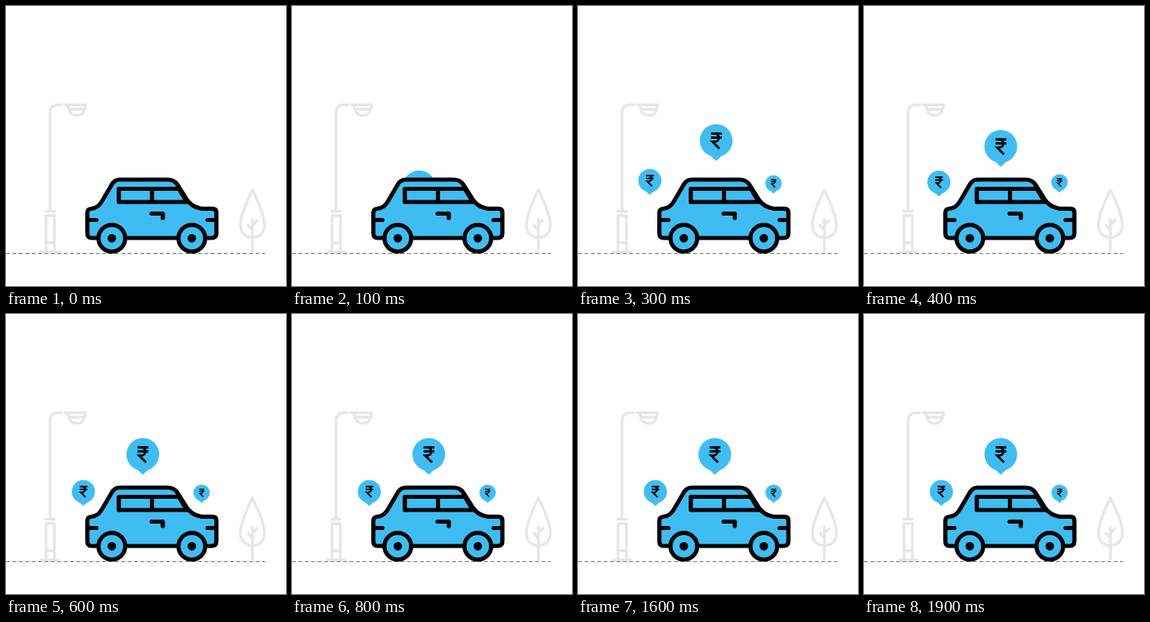
An HTML page that plays this animation: 350 by 350 pixels, repeating every 2000 ms.

```html
<!DOCTYPE html>
<html lang="en">
<head>
<meta charset="utf-8">
<title>Car with rupee pins</title>
<style>
  html, body { margin: 0; width: 100%; height: 100%; overflow: hidden; background: #fff; }
  svg { display: block; width: 100vw; height: 100vh; }
  path, circle { stroke-linejoin: round; }
  .scenery { fill: none; stroke: #e6e6e6; stroke-width: 3.4; }
  .car { fill: #3fbdf3; stroke: #000; stroke-width: 5.2; stroke-linecap: round; }
  .pin { fill: #3fbdf3; }
  .sign { fill: none; stroke: #000; stroke-width: 2.9; stroke-linejoin: miter; }
</style>
</head>
<body>
<svg viewBox="0 0 350 350">
  <defs>
    <g id="pin">
      <path class="pin" d="M-9 17 L0 25.5 L9 17Z"/>
      <circle class="pin" r="20.5"/>
      <path class="sign" d="M-6.5 -8.8H7M-6.5 -3.8H7M-6.5 -8.8H-2C5 -8.800 5 1.500 -2 1.500H-4.500L4 10"/>
    </g>
    <g id="wheel">
      <circle r="16.7"/>
      <circle r="2.8"/>
    </g>
  </defs>

  <g class="scenery">
    <path d="M55 256V134Q55 123.500 65 123.500H71M72.500 123.500H101M77 124.500L79 129H98L100 124.500M79 129C80 139.500 97 139.500 98 129"/>
    <path d="M48 256.500H62M50 307V262H60.500V307M50 296H60.500M43 307.500H67"/>
    <path d="M308 230C303 240 293 260 293 274C293 284 300 289.500 308 289.500C316 289.500 323 284 323 274C323 260 313 240 308 230ZM308 265V308M301.500 273L308 280M314.500 267L308 274"/>
  </g>
  <path d="M0 309.500H324" stroke="#777" stroke-width="1.200" stroke-dasharray="5 3"/>

  <g id="pins"></g>

  <g class="car">
    <path d="M101.700 284V258Q101.700 254 106 253.500C114 252.500 117 249 120 244L132.300 223Q135.800 217 142 217H202Q210 217 214 223L226 242Q232 251 244 253.300H258Q263 253.300 263 258V284Q263 290 257 290H107Q101.700 290 101.700 284Z"/>
    <path d="M141 228.500H216L226 245H141ZM182.500 228.500V245"/>
    <path fill="none" d="M182 259.500H196V265M103 267.500H113M252 267.500H262"/>
    <use href="#wheel" x="132.300" y="290.300"/>
    <use href="#wheel" x="232.300" y="290.300"/>
  </g>
</svg>
<script>
  const LOOP = 2000, STEP = 100, SPAN = 340;

  const pins = [
    { from: [150, 264], to: [171, 175.5], size: 1, delay: 64 },
    { from: [171, 263], to: [96.7, 222], size: 0.705, delay: 124 },
    { from: [246, 264], to: [244.5, 223.5], size: 0.5, delay: 157 }
  ];

  const layer = document.getElementById('pins');
  for (const pin of pins) {
    pin.node = document.createElementNS('http://www.w3.org/2000/svg', 'use');
    pin.node.setAttribute('href', '#pin');
    layer.appendChild(pin.node);
  }

  function backOut(u) {
    const s = 1.70158, w = 1 - Math.min(u, 1);
    return 1 + s * w ** 2 - (s + 1) * w ** 3;
  }

  function draw(time) {
    for (const { node, from, to, size, delay } of pins) {
      const u = (time - delay) / SPAN;
      node.style.display = u > 0 ? '' : 'none';
      if (u <= 0) continue;
      const k = backOut(u);
      const [x, y] = from.map((a, i) => a + (to[i] - a) * k);
      node.setAttribute('transform', `translate(${x} ${y}) scale(${size})`);
    }
  }

  const start = performance.now();
  function tick() {
    const time = (performance.now() - start) % LOOP;
    draw(Math.floor(time / STEP) * STEP);
    requestAnimationFrame(tick);
  }
  tick();
</script>
</body>
</html>
```
